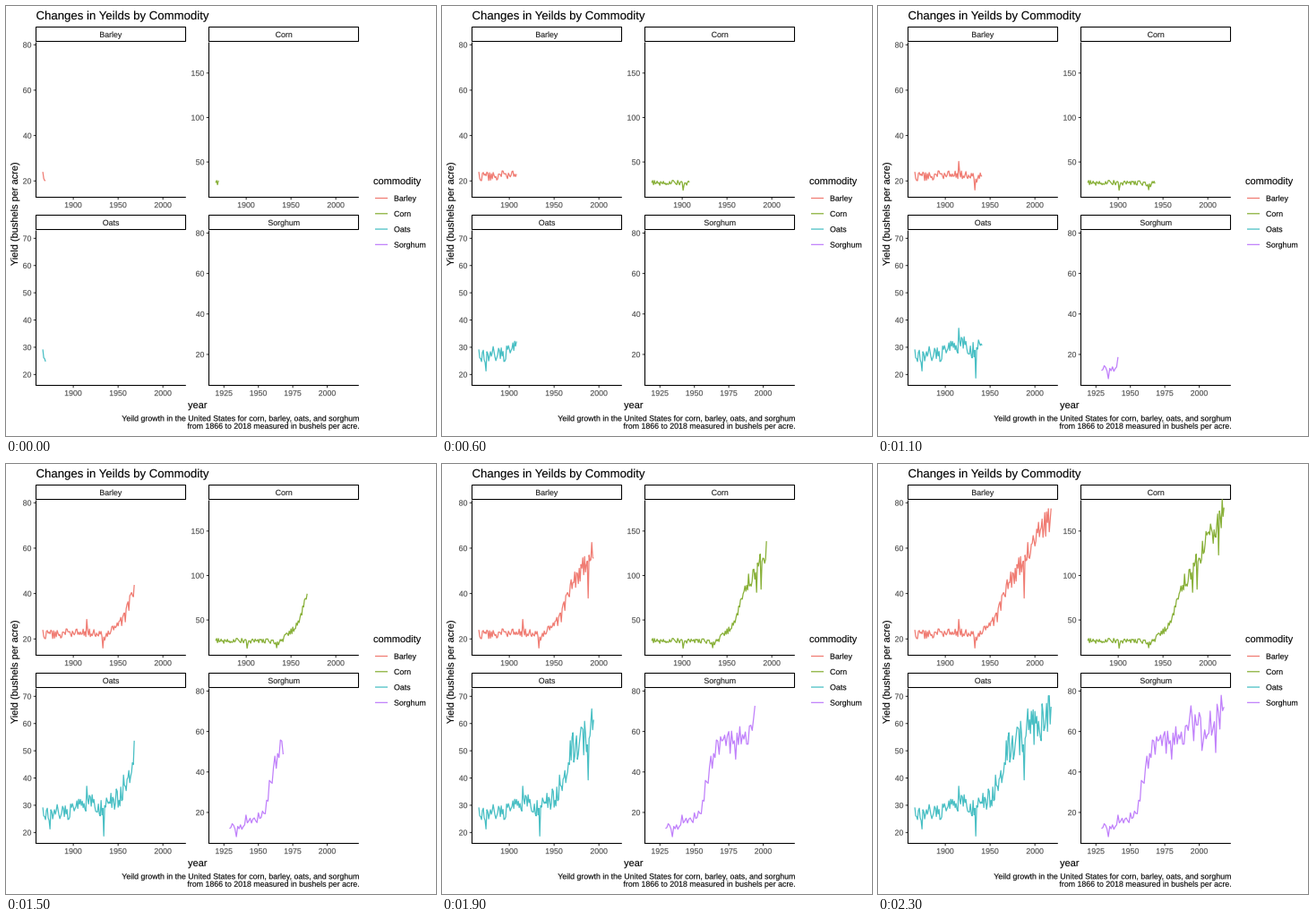
These frames come from a looping animation (480 px wide and 480 px high, 2.4 s). A matplotlib script:

```python
import matplotlib.pyplot as plt
import numpy as np
from matplotlib.animation import FuncAnimation
from matplotlib.patches import PathPatch, Rectangle
from matplotlib.textpath import TextPath
from matplotlib.transforms import Affine2D

plt.rcParams["font.family"] = "Liberation Sans"

SIZE, DPI = 480, 72
FRAMES, INTERVAL = 24, 100
W, H = 167.3, 173
LONG = (1858.4, 2025.6, range(1900, 2001, 50))
SHORT = (1914.05, 2022.95, range(1925, 2001, 25))
ALIGN = {"left": 0, "center": 0.5, "right": 1}

# trend: long-run level; marks: years that stand out; rough: relative scatter
CROPS = [
    dict(name="Barley", color="#F07C73", left=33.5, top=40.5, xscale=LONG,
         yscale=(12.8, 81.1, range(20, 81, 20)), rough=0.09,
         trend={1866: 22, 1930: 23, 1936: 20.5, 1957: 29, 1970: 44, 2018: 75},
         marks={1866: 24, 1915: 28.6, 1933: 16, 1968: 43.8, 1988: 38, 1992: 62.5,
                2018: 77.5}),
    dict(name="Corn", color="#88B038", left=226.5, top=40.5, xscale=LONG,
         yscale=(10.3, 184.6, range(50, 151, 50)), rough=0.11,
         trend={1866: 26.5, 1928: 26.5, 1935: 23, 1955: 42, 1972: 88, 2018: 172},
         marks={1901: 18.2, 1934: 18.7, 1968: 79.5, 1983: 81.1, 1988: 84.6,
                1994: 138.6, 2012: 123.1, 2018: 176.4}),
    dict(name="Oats", color="#48BFC4", left=33.5, top=250.5, xscale=LONG,
         yscale=(16.0, 72.9, range(20, 71, 10)), rough=0.12,
         trend={1866: 27.5, 1892: 27, 1915: 31, 1935: 29, 1953: 34, 1971: 51,
                2018: 64},
         marks={1866: 29.2, 1868: 25.8, 1874: 21.3, 1915: 37, 1934: 18.7,
                1968: 53.7, 1988: 39.3, 1992: 65.4, 2015: 70.2}),
    dict(name="Sorghum", color="#C080FB", left=226.5, top=250.5, xscale=SHORT,
         yscale=(4.7, 81.3, range(20, 81, 20)), rough=0.13,
         trend={1929: 13.5, 1938: 13, 1955: 19.5, 1958: 34, 1966: 52, 2018: 67},
         marks={1934: 8, 1941: 18.7, 1966: 55.8, 1980: 46.3, 1994: 72.7,
                2002: 50.6, 2012: 49.6, 2016: 77.9, 2018: 72.1}),
]

fig = plt.figure(figsize=(SIZE / DPI, SIZE / DPI), dpi=DPI, facecolor="white")
ax = fig.add_axes([0, 0, 1, 1])
ax.set(xlim=(0, SIZE), ylim=(SIZE, 0))
ax.axis("off")


def label(x, y, s, size=8.8, color="black", ha="left", angle=0):
    """Text as outlines, so letters keep their fractional positions."""
    path = TextPath((0, 0), s, size=size)
    box = path.get_extents()
    place = (Affine2D().translate(-ALIGN[ha] * (box.x0 + box.x1), 0)
             .rotate_deg(angle).scale(1, -1).translate(x, y))
    ax.add_patch(PathPatch(place.transform_path(path), fc=color, ec=color,
                           lw=0.12, snap=False))


def stroke(xs, ys, color="black", lw=1.07):
    return ax.plot(xs, ys, color=color, lw=lw, solid_capstyle="butt",
                   solid_joinstyle="round", snap=False)[0]


def harvests(trend, marks, rough, seed):
    """Scatter yearly values around the trend and pin the marked years."""
    rng = np.random.default_rng(seed)
    knots = list(trend)
    years = np.arange(knots[0], knots[-1] + 1)
    level = np.interp(years, knots, list(trend.values()))
    values = level * (1 + rng.uniform(-rough, rough, len(years)))
    for year, value in marks.items():
        values[year - knots[0]] = value
    return years, values


def panel(seed, name, color, left, top, xscale, yscale, rough, trend, marks):
    bottom = top + H
    x0, x1, xticks = xscale
    y0, y1, yticks = yscale

    def px(x):
        return left + (x - x0) / (x1 - x0) * W

    def py(y):
        return bottom - (y - y0) / (y1 - y0) * H

    ax.add_patch(Rectangle((left, top - 17), W - 0.3, 16, fc="white", ec="black",
                           lw=1.07, joinstyle="miter", snap=False))
    label(left + W / 2, top - 5.6, name, color="#1A1A1A", ha="center")
    for t in xticks:
        stroke([px(t)] * 2, [bottom, bottom + 2.75], "#333333")
        label(px(t), bottom + 11.6, str(t), color="#4D4D4D", ha="center")
    for t in yticks:
        stroke([left - 2.75, left], [py(t)] * 2, "#333333")
        label(left - 5, py(t) + 3.2, str(t), color="#4D4D4D", ha="right")
    stroke([left, left], [top, bottom + 0.5])
    stroke([left - 0.5, left + W], [bottom, bottom])

    years, values = harvests(trend, marks, rough, seed)
    return stroke([], [], color, 1.25), years, px(years), py(values)


curves = [panel(seed, **crop) for seed, crop in enumerate(CROPS)]

label(33.5, 15, "Changes in Yeilds by Commodity", 13.2)
label(213.7, 449, "year", 11, ha="center")
label(13, 232.5, "Yield (bushels per acre)", 11, ha="center", angle=90)
label(394, 463.3, "Yeild growth in the United States for corn, barley, oats, and sorghum",
      ha="right")
label(394, 471.8, "from 1866 to 2018 measured in bushels per acre.", ha="right")

label(410, 199, "commodity", 11)
for i, crop in enumerate(CROPS):
    y = 214.5 + 17.28 * i
    stroke([412, 426], [y, y], crop["color"], 1.25)
    label(433, y + 3.2, crop["name"])


def draw(k):
    last = min(2018, round(1868.9 + 6.59 * k))
    for line, years, xs, ys in curves:
        shown = years <= last
        line.set_data(xs[shown], ys[shown])
    return [c[0] for c in curves]


anim = FuncAnimation(fig, draw, frames=FRAMES, interval=INTERVAL, repeat=True,
                     repeat_delay=0, blit=False)
plt.show()
```
